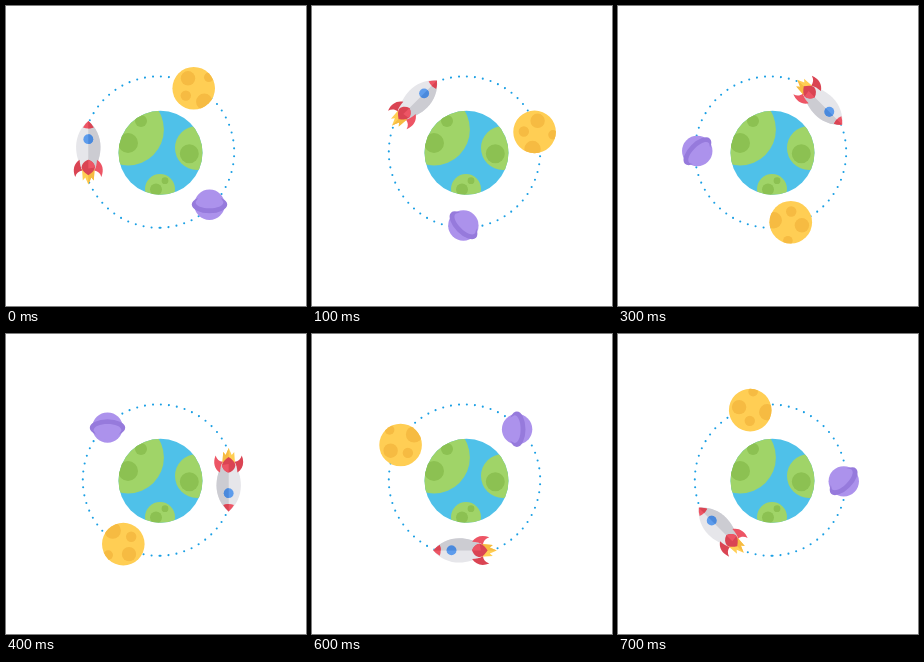
Animation of 300x300 px, one loop 800 ms. Source, as an HTML page:

```html
<!DOCTYPE html>
<html lang="en">
<head>
<meta charset="utf-8">
<title>Orbit</title>
<style>
  html, body { margin: 0; width: 100%; height: 100%; overflow: hidden; background: #fff; }
  svg { display: block; width: 100%; height: 100%; }
</style>
</head>
<body>
<svg viewBox="0 0 300 300">
  <defs>
    <clipPath id="globe"><circle cx="154.5" cy="146.7" r="42"/></clipPath>
    <clipPath id="disc"><circle cx="187.7" cy="82.3" r="21.3"/></clipPath>
    <clipPath id="right"><rect x="82.3" y="110" width="20" height="70"/></clipPath>
    <path id="flame" d="M76 163L76.8 174.5L79.3 171.5L82.3 178.5L85.3 171.5L87.8 174.5L88.6 163Z"/>
    <path id="hull" d="M82.3 115C90 121 94.5 131 94.5 141C94.5 149 92 157 88.5 163H76.1C72.6 157 70.1 149 70.1 141C70.1 131 74.6 121 82.3 115Z"/>
    <path id="nose" d="M82.3 115Q85.6 117.8 87.6 121.5Q82.3 123.4 77 121.5Q79 117.8 82.3 115Z"/>
    <circle id="window" cx="82.3" cy="133.2" r="4.9"/>
    <path id="fin" d="M73.6 153.8C68 157.5 66.3 164 69.2 171C70.4 167 72.8 165.2 76.4 164.6C74.6 161.5 73.8 158 73.6 153.8Z"/>
  </defs>

  <circle cx="152.5" cy="146.1" r="75.7" fill="none" stroke="#1a9fe4" stroke-width="2.1"
    stroke-linecap="round" stroke-dasharray="0 8.03" transform="rotate(89.24 152.5 146.1)"/>

  <g clip-path="url(#globe)">
    <rect x="112" y="104" width="85" height="85" fill="#4fc1e9"/>
    <g fill="#a0d468">
      <circle cx="122" cy="123.6" r="35.9"/>
      <circle cx="191" cy="142" r="22"/>
      <circle cx="154" cy="183" r="15"/>
    </g>
    <g fill="#8cc152">
      <circle cx="135" cy="115" r="6"/>
      <circle cx="122" cy="137" r="10"/>
      <circle cx="183.3" cy="147.8" r="9.5"/>
      <circle cx="159" cy="174.7" r="3.4"/>
      <circle cx="150" cy="183.5" r="6"/>
    </g>
  </g>

  <g id="orbit">
    <g id="moon" clip-path="url(#disc)">
      <rect x="166" y="60" width="44" height="45" fill="#ffce54"/>
      <g fill="#f6bb42">
        <circle cx="182" cy="72.3" r="7.2"/>
        <circle cx="202.8" cy="71.3" r="4.8"/>
        <circle cx="179.8" cy="89.6" r="5.2"/>
        <circle cx="198.3" cy="95.8" r="8.2"/>
      </g>
    </g>

    <g id="ringed" fill="#ac92ec">
      <circle cx="203.5" cy="198.8" r="15.2"/>
      <ellipse cx="203.5" cy="198.6" rx="17.7" ry="8.6" fill="#967adc"/>
      <path d="M189.6 196A15.2 15.2 0 0 1 217.4 196C217.4 200 211 202.3 203.5 202.3S189.6 200 189.6 196Z"/>
    </g>

    <g id="rocket">
      <use href="#flame" fill="#ffce54"/>
      <use href="#flame" fill="#f6bb42" clip-path="url(#right)"/>
      <use href="#hull" fill="#e6e6ea"/>
      <use href="#hull" fill="#ccccd2" clip-path="url(#right)"/>
      <use href="#nose" fill="#ed5565"/>
      <use href="#nose" fill="#da4453" clip-path="url(#right)"/>
      <use href="#window" fill="#5d9cec"/>
      <use href="#window" fill="#4a89dc" clip-path="url(#right)"/>
      <use href="#fin" fill="#da4453"/>
      <use href="#fin" fill="#ed5565" transform="matrix(-1 0 0 1 164.6 0)"/>
      <path d="M82.3 153.8C86 155 88.8 158 89 161.5C88.5 164.5 85.6 167 82.3 169.3C79 167 76.1 164.5 75.6 161.5C75.8 158 78.6 155 82.3 153.8Z" fill="#da4453"/>
      <path d="M82.3 153.8C86 155 88.8 158 89 161.5L82.3 162.5Z" fill="#ed5565"/>
    </g>
  </g>
</svg>
<script>
  const orbit = document.getElementById('orbit');
  const STEP = 100, STEPS = 8;
  const start = performance.now();

  // The bodies jump an eighth of a turn clockwise at each step.
  function draw() {
    const step = Math.floor((performance.now() - start) / STEP) % STEPS;
    orbit.setAttribute('transform', `rotate(${step * 360 / STEPS} 152.5 146.2)`);
    requestAnimationFrame(draw);
  }
  draw();
</script>
</body>
</html>
```
